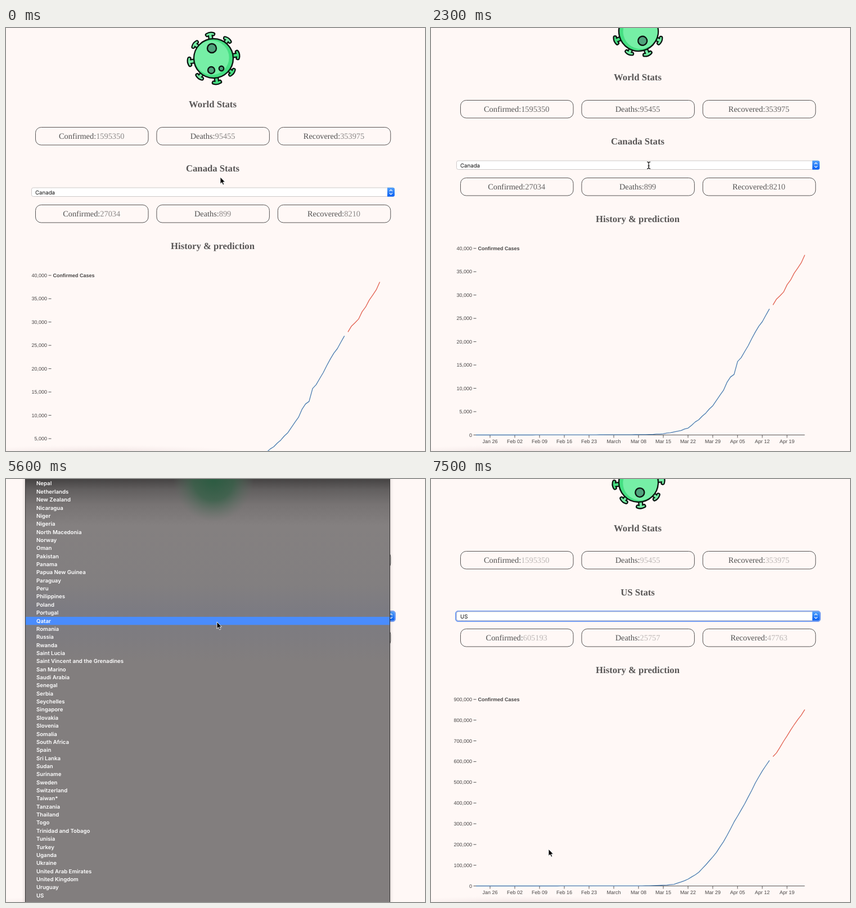
These frames come from a looping animation (745 px wide and 752 px high, 7600 ms). An HTML page:

```html
<!DOCTYPE html>
<html lang="en">
<head>
<meta charset="utf-8">
<title>Stats dashboard</title>
<style>
  html, body { margin: 0; width: 100%; height: 100%; overflow: hidden; background: #fff8f6; }
  svg { display: block; width: 745px; height: 752px; text-rendering: geometricPrecision; }
  text { fill: #505050; }
  .head { font: bold 16.7px "Liberation Serif", Times, serif; text-anchor: middle; fill: #585656; }
  .stat { font: 14.35px "Liberation Serif", Times, serif; text-anchor: middle; font-variant-ligatures: none; }
  .axis { font: 9px "Liberation Sans", Arial, sans-serif; fill: #484646; }
  .menu text { font: 600 9.65px Inter, sans-serif; fill: #fff; }
  .box { fill: none; stroke: #565454; }
  .line { fill: none; stroke-width: 1.3; stroke-linejoin: round; }
</style>
</head>
<body>
<svg viewBox="0 0 745 752">
  <defs>
    <linearGradient id="blue" x2="0" y2="1">
      <stop stop-color="#55a2fb"/><stop offset="1" stop-color="#0a60f3"/>
    </linearGradient>
    <linearGradient id="glass" gradientUnits="userSpaceOnUse" x1="0" y1="0" x2="0" y2="752">
      <stop stop-color="#454343"/><stop offset=".025" stop-color="#625f5f"/>
      <stop offset=".06" stop-color="#777373"/><stop offset=".11" stop-color="#848080"/>
      <stop offset=".25" stop-color="#827f80"/><stop offset=".31" stop-color="#7c7b82"/>
      <stop offset=".37" stop-color="#7e7c80"/><stop offset=".43" stop-color="#827e7e"/>
      <stop offset="1" stop-color="#827e7e"/>
    </linearGradient>
    <radialGradient id="glow">
      <stop stop-color="#2c5c42"/><stop offset=".5" stop-color="#386149" stop-opacity=".8"/>
      <stop offset="1" stop-color="#5c6f63" stop-opacity="0"/>
    </radialGradient>
    <radialGradient id="haze">
      <stop stop-color="#e6d5d6" stop-opacity=".7"/><stop offset="1" stop-color="#f4e8e8" stop-opacity="0"/>
    </radialGradient>
    <clipPath id="view"><rect width="745" height="747.5"/></clipPath>
    <filter id="soft"><feGaussianBlur stdDeviation="3"/></filter>
  </defs>

  <g id="page">
    <g id="virus"></g>
    <g id="stats"></g>
    <rect id="ring" x="43.5" y="282.5" width="649" height="19" rx="4.5" fill="#80a6f6" stroke="#6f98f0"/>
    <rect x="45.5" y="284" width="645" height="15.5" rx="3" fill="#fff" stroke="#c9c4c4" stroke-width=".9"/>
    <path d="M678 283.7H688Q691 283.7 691 286.7V296.7Q691 299.7 688 299.7H678Z" fill="url(#blue)"/>
    <path d="M681.8 290.2 684.4 287.6 687 290.2M681.8 293.4 684.4 296 687 293.4" fill="none" stroke="#fff" stroke-width="1.2"/>
    <text id="choice" x="52" y="295.5" style="font:9.7px Inter,sans-serif;fill:#111"></text>
    <g id="chart"></g>
  </g>
  <ellipse cx="170" cy="754" rx="260" ry="13" fill="url(#haze)"/>

  <g id="popup" class="menu">
    <rect x="34" y="-10" width="649" height="780" fill="#000" opacity=".22" filter="url(#soft)"/>
    <rect x="34.5" y="-2" width="648" height="760" fill="url(#glass)" stroke="#343232"/>
    <ellipse cx="369" cy="0" rx="72" ry="76" fill="url(#glow)"/>
    <rect id="mark" x="35" width="647" height="14.4" fill="#4a8cfd"/>
    <g clip-path="url(#view)"><g id="list"></g></g>
  </g>

  <path id="arrow" d="M0 0V12.2L2.8 9.6 4.8 14 6.8 13.1 4.9 8.9H8.6Z" stroke="#fff" stroke-width=".9"/>
  <path id="beam" d="M-3-6Q0-6 0-4Q0-6 3-6M0-5V5M-3 6Q0 6 0 4Q0 6 3 6M-1.5 1H1.5" fill="none" stroke="#111" stroke-width="1.2"/>
</svg>

<script>
const $ = id => document.getElementById(id);
const LOOP = 7600, OPEN = 4000, CLOSE = 6800;

const regions = [
  { name: "Canada", stats: [27034, 899, 8210], max: 40000, step: 5000,
    past: [64, 77, 79, 108, 117, 193, 198, 252, 415, 478, 657, 800, 943, 1277, 1469, 2088, 2790, 3251,
      4042, 4682, 5576, 6280, 7398, 8527, 9560, 11284, 12437, 12978, 15756, 16563, 17872, 19141,
      20654, 22059, 23316, 24299, 25679, 27034],
    next: [27865, 29130, 29855, 30640, 32210, 33230, 34680, 35770, 36910, 38600] },
  { name: "US", stats: [605193, 25757, 47763], max: 900000, step: 100000,
    past: [518, 583, 959, 1281, 1663, 2179, 2727, 3499, 4632, 6421, 7783, 13747, 19273, 25600, 33276,
      43847, 53740, 65778, 83836, 101657, 121478, 140886, 161807, 188172, 213372, 243453, 275586,
      308850, 337072, 366614, 396223, 429052, 461437, 496535, 526396, 555313, 580619, 605193],
    next: [624e3, 642e3, 669e3, 698e3, 724e3, 752e3, 778e3, 802e3, 824e3, 851e3] }
];

const countries = `Bahamas|Bahrain|Bangladesh|Barbados|Belarus|Belgium|Benin|Bhutan|Bolivia|Bosnia and Herzegovina|Brazil|Brunei|Bulgaria|Burkina Faso|Cabo Verde|Cambodia|Cameroon|Canada|Central African Republic|Chad|Chile|China|Colombia|Congo (Brazzaville)|Congo (Kinshasa)|Costa Rica|Cote d'Ivoire|Croatia|Dappled Marquise|Cuba|Cyprus|Czechia|Denmark|Djibouti|Dominican Republic|Ecuador|Egypt|El Salvador|Equatorial Guinea|Eritrea|Estonia|Eswatini|Ethiopia|Fiji|Finland|France|Gabon|Gambia|Georgia|Germany|Ghana|Greece|Guatemala|Guinea|Guyana|Haiti|Holy See|Honduras|Hungary|Iceland|India|Indonesia|Iran|Iraq|Ireland|Israel|Italy|Jamaica|Japan|Jordan|Kazakhstan|Kenya|Korea, South|Kuwait|Kyrgyzstan|Latvia|Lebanon|Liberia|Liechtenstein|Lithuania|Luxembourg|Madagascar|Malaysia|Maldives|Malta|Mauritania|Mauritius|Mexico|Moldova|Monaco|Mongolia|Montenegro|Morocco|Mozambique|Namibia|Nepal|Netherlands|New Zealand|Nicaragua|Niger|Nigeria|North Macedonia|Norway|Oman|Pakistan|Panama|Papua New Guinea|Paraguay|Peru|Philippines|Poland|Portugal|Qatar|Romania|Russia|Rwanda|Saint Lucia|Saint Vincent and the Grenadines|San Marino|Saudi Arabia|Senegal|Serbia|Seychelles|Singapore|Slovakia|Slovenia|Somalia|South Africa|Spain|Sri Lanka|Sudan|Suriname|Sweden|Switzerland|Taiwan*|Tanzania|Thailand|Togo|Trinidad and Tobago|Tunisia|Turkey|Uganda|Ukraine|United Arab Emirates|United Kingdom|Uruguay|US|Uzbekistan`.split("|");

// Country list
const ROW = 14.357, TOP = -0.5;
const rowY = i => TOP + i * ROW;
const checkY = rowY(countries.indexOf("Canada"));
const listEnd = rowY(countries.indexOf("Nepal")) - 8.1;
$("list").innerHTML = countries.map((c, i) => `<text x="54" y="${rowY(i) + 3.4}">${c}</text>`).join("") +
  `<path d="M41 ${checkY + .5}l2.4 3 4.6-7" fill="none" stroke="#fff" stroke-width="1.6"/>`;

// Virus
const circle = (x, y, r, fill, extra = "") => `<circle cx="${x}" cy="${y}" r="${r}" fill="${fill}" ${extra}/>`;
const ink = `stroke="#0c1410" stroke-width="2.4"`;
function spike(k) {
  const color = k > 1 && k < 5 ? "#45df82" : "#74efa5";
  const stroke = (d, c, w) => `<path d="${d}" stroke="${c}" stroke-width="${w}"/>`;
  const stem = "M0-33V-43", cap = "M-5.5-42.8Q0-45.2 5.5-42.8";
  return `<g transform="rotate(${k * 45 - 8}) scale(${k % 2 ? .96 : 1})" fill="none" stroke-linecap="round">` +
    stroke(stem, "#0c1410", 9) + stroke(cap, "#0c1410", 7.6) + stroke(stem, color, 4.4) + stroke(cap, color, 3) + "</g>";
}
$("virus").innerHTML = [...Array(8).keys()].map(spike).join("") +
  circle(0, 0, 35, "#45df82", ink) + circle(-3, -1.2, 30.6, "#76efa6") +
  circle(-3, -18, 8, "#4fa37c", ink) + circle(-4, 21, 6, "#4fa37c", ink) + circle(14, 18, 4.2, "#4fa37c", ink);

// Page content for one region
const head = (s, y) => `<text class="head" x="367.5" y="${y}">${s}</text>`;
const boxes = (values, y) => ["Confirmed", "Deaths", "Recovered"].map((label, i) => {
  const x = 52.5 + i * 215.4;
  return `<rect class="box" x="${x}" y="${y}" width="200.5" height="31.5" rx="10"/>` +
    `<text class="stat" x="${x + 99.7}" y="${y + 20}">${label}:<tspan class="num">${values[i]}</tspan></text>`;
}).join("");

const ZERO = 771.5, HEIGHT = 331.7, DAY = 6.286;
const weeks = ["Jan 26", "Feb 02", "Feb 09", "Feb 16", "Feb 23", "March", "Mar 08", "Mar 15", "Mar 22",
  "Mar 29", "Apr 05", "Apr 12", "Apr 19"];

function drawChart({ max, step, past, next }) {
  const y = v => ZERO - v / max * HEIGHT;
  const line = (data, day, color) => `<polyline class="line" stroke="${color}" points="` +
    data.map((v, i) => `${80 + (day + i) * DAY},${y(v)}`).join(" ") + `"/>`;
  const early = Array.from({ length: 46 }, (_, i) => past[0] * (i / 46) ** 3);
  let ticks = "M75.5 771.5H664.5", out = "";
  for (let v = 0; v <= max; v += step) {
    if (v) ticks += `M75.5 ${y(v)}h5`;
    out += `<text class="axis" x="73" y="${y(v) + 3}" text-anchor="end">${v.toLocaleString("en-US")}</text>`;
  }
  weeks.forEach((w, i) => {
    const x = 105 + i * 44;
    ticks += `M${x} ${ZERO}v5`;
    out += `<text class="axis" x="${x}" y="785.8" text-anchor="middle">${w}</text>`;
  });
  return out + `<path d="${ticks}" stroke="#555"/>` +
    `<text class="axis" x="83.5" y="442.6" style="font-weight:bold">Confirmed Cases</text>` +
    line([...early, ...past], 0, "#4a7cb0") + line(next, 84, "#e2604f");
}

let shown, nums;
function show(region) {
  if (shown === region) return;
  shown = region;
  $("stats").innerHTML = head("World Stats", 141) + boxes([1595350, 95455, 353975], 176.5) +
    head(region.name + " Stats", 255) + boxes(region.stats, 314.5) + head("History &amp; prediction", 393);
  $("choice").textContent = region.name;
  $("chart").innerHTML = drawChart(region);
  nums = document.querySelectorAll(".num");
}

// Motion
const ease = (t, a, b) => {
  const p = Math.min(1, Math.max(0, (t - a) / (b - a)));
  return p * p * (3 - 2 * p);
};
const path = [[0, 381, 265], [1000, 387, 259], [1700, 387, 259], [2000, 387, 244], [3700, 388, 245],
  [4000, 388, 245], [4400, 375, 254], [5600, 375, 254], [6500, 61, 742], [6800, 61, 742], [7300, 209, 658]];
function pointer(t) {
  let [, x, y] = path[0];
  for (let i = 1; i < path.length; i++) {
    const p = ease(t, path[i - 1][0], path[i][0]);
    x += (path[i][1] - path[i - 1][1]) * p;
    y += (path[i][2] - path[i - 1][2]) * p;
  }
  return [x, y];
}
const move = (id, x, y) => $(id).setAttribute("transform", `translate(${x} ${y})`);
const toggle = (id, on) => $(id).setAttribute("display", on ? "inline" : "none");

function draw(t) {
  const [x, y] = pointer(t), typing = t >= 2000 && t < 2900;
  show(regions[t < CLOSE ? 0 : 1]);
  move("page", 0, -Math.round(48 * ease(t, 1700, 2200)));
  $("virus").setAttribute("transform", `translate(369 54) rotate(${t * .0723})`);

  const phase = Math.abs((t / 1000 + 4.6) % 4 - 2);
  nums.forEach(n => n.setAttribute("fill-opacity", 1 - .17 * phase * phase));

  const scroll = listEnd * ease(t, 4800, 5600);
  toggle("popup", t >= OPEN && t < CLOSE);
  toggle("ring", t >= OPEN);
  move("list", 0, -scroll);
  $("mark").setAttribute("y", rowY(Math.round((y + scroll - TOP) / ROW)) - scroll - ROW / 2);

  toggle("arrow", !typing);
  toggle("beam", typing);
  move("arrow", x, y);
  move("beam", x, y);
}
function tick() {
  draw(Math.floor(performance.now() % LOOP / 100) * 100);
  requestAnimationFrame(tick);
}
tick();
</script>
</body>
</html>
```
